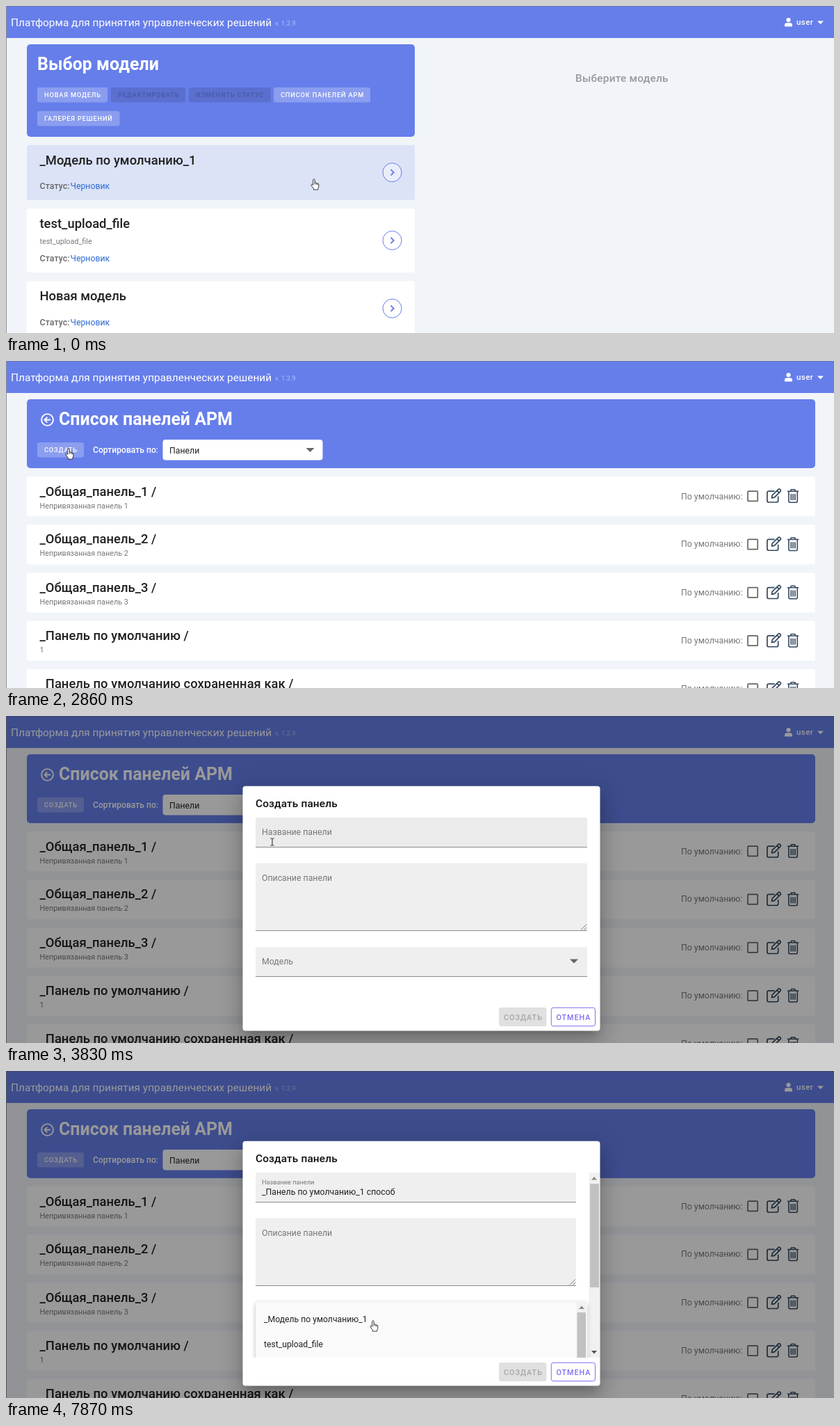
An HTML page for the animation above (7990 ms loop, 1191 by 470 pixels).

```html
<!DOCTYPE html>
<html lang="ru">
<head>
<meta charset="utf-8">
<title>Панели</title>
<style>
html, body { margin: 0; width: 100%; height: 100%; overflow: hidden; background: #f1f5fa; }
svg, #scrim, #shadow { position: absolute; left: 0; top: 0; }
svg { width: 1191px; height: 470px; font-family: Roboto, sans-serif; }
text { white-space: pre; }
#scrim { width: 1191px; height: 470px; background: #000; }
#shadow { left: 341px; top: 101px; width: 513px; height: 351px; border-radius: 4px;
  box-shadow: 0 8px 12px -5px rgba(0,0,0,.2), 0 18px 29px 2px rgba(0,0,0,.14), 0 7px 35px 6px rgba(0,0,0,.12); }
</style>
</head>
<body>
<svg id="page"></svg>
<div id="scrim"></div>
<div id="shadow"></div>
<svg id="form"></svg>
<svg id="pointer"></svg>
<script>
const LOOP = 7990;
const BLUE = '#667eea', INK = '#212121', GREY = '#777', ICON = '#34495e';
const $ = id => document.getElementById(id);

function add(parent, tag, attrs) {
  const e = document.createElementNS('http://www.w3.org/2000/svg', tag);
  for (const k in attrs) e.setAttribute(k, attrs[k]);
  parent.appendChild(e);
  return e;
}
const group = (p, attrs = {}) => add(p, 'g', attrs);
const rect = (p, x, y, w, h, fill, rx = 0) => add(p, 'rect', { x, y, width: w, height: h, fill, rx });
const path = (p, d, fill, stroke = 'none', width = 1) =>
  add(p, 'path', { d, fill, stroke, 'stroke-width': width });
function text(p, x, y, str, size, fill = INK, weight = 400, gap = 0) {
  const e = add(p, 'text', { x, y, fill, 'font-size': size, 'font-weight': weight });
  if (gap) e.setAttribute('letter-spacing', gap);
  e.textContent = str;
  return e;
}
const show = (e, on) => { e.style.display = on ? '' : 'none'; };

// ---------- page ----------
const page = $('page');
rect(page, 0, 0, 1191, 470, '#f1f5fa');
const listA = group(page), listB = group(page);

function button(p, x, y, w, label, off) {
  const r = rect(p, x, y, w, 21.5, off ? 'rgba(0,0,0,.12)' : 'rgba(255,255,255,.24)', 3);
  text(p, x + 10, y + 14.3, label, 9.3, off ? 'rgba(0,0,0,.2)' : '#fff', 500, .8);
  return r;
}

rect(listA, 30, 55, 558, 133, BLUE, 5);
text(listA, 45, 92, 'Выбор модели', 24.95, '#fff', 700);
button(listA, 45, 117, 101, 'НОВАЯ МОДЕЛЬ');
button(listA, 151, 117, 107, 'РЕДАКТИРОВАТЬ', true);
button(listA, 263, 117, 118, 'ИЗМЕНИТЬ СТАТУС', true);
const panelsBtn = button(listA, 385, 117, 139, 'СПИСОК ПАНЕЛЕЙ АРМ');
button(listA, 45, 151, 118.5, 'ГАЛЕРЕЯ РЕШЕНИЙ');

function model(y, h, title, note) {
  const r = rect(listA, 30, y, 558, h, '#fff', 3);
  const base = Math.floor(y);
  text(listA, 48.5, base + 28, title, 18.4, INK, 500);
  if (note) text(listA, 48.5, base + 51, note, 10.8, GREY);
  text(listA, 48.5, y + h - 16, 'Статус:', 12.3, '#666', 500, .1);
  text(listA, 92.5, y + h - 16, 'Черновик', 12.3, '#2a69d0');
  const cy = y + h / 2 - .3;
  add(listA, 'circle', { cx: 555.5, cy, r: 13.5, fill: '#fff', 'fill-opacity': .4, stroke: BLUE });
  path(listA, `M553.5 ${cy - 4.2}l4.2 4.2-4.2 4.2`, 'none', BLUE, 1.9);
  return r;
}
const firstModel = model(200, 79, '_Модель по умолчанию_1');
model(291.5, 91.5, 'test_upload_file', 'test_upload_file');
model(395.5, 79, 'Новая модель');
text(listA, 819, 109, 'Выберите модель', 15.4, '#999', 500, .2);

rect(listB, 30, 55, 1134, 99, BLUE, 5);
add(listB, 'circle', { cx: 59.5, cy: 84.5, r: 8.4, fill: 'none', stroke: '#fff', 'stroke-width': 1.9 });
path(listB, 'M64 84.5H56M59.3 80.7l-3.8 3.8 3.8 3.8', 'none', '#fff', 1.9);
text(listB, 76, 92, 'Список панелей АРМ', 24.95, '#fff', 700);
const createBtn = button(listB, 45, 117, 67, 'СОЗДАТЬ');
text(listB, 125, 132, 'Сортировать по:', 12.1, '#fff', 500);
rect(listB, 225.5, 113, 230, 29.5, '#fff', 4);
text(listB, 235, 132.5, 'Панели', 12.3);
path(listB, 'M431.5 125h12l-6 6z', '#666');

function panel(i, title, note) {
  const y = 166 + i * 69.25, base = Math.floor(y - .3 * (i > 0));
  const r = rect(listB, 30, y, 1134, 57, '#fff', 3);
  text(listB, 48.5, base + 28, title + ' /', 18.4, INK, 500);
  text(listB, 48.5, base + 46, note, 10.8, GREY);
  text(listB, 971, base + 33, 'По умолчанию:', 12.3, GREY);
  const g = group(listB, { transform: `translate(0 ${y})` });
  add(g, 'rect', { x: 1067, y: 21.2, width: 14.2, height: 14.2, rx: 1, fill: 'none', stroke: '#666', 'stroke-width': 1.7 });
  path(g, 'M1105.5 21.2h-8.3q-2.3 0-2.3 2.3v11.2q0 2.3 2.3 2.3h11.2q2.3 0 2.3-2.3v-6.2' +
    'M1101.5 30.7l.7-3.7 8.8-8.6q1-.8 2 0l1 1q.8 1 0 2l-8.8 8.7zM1109 20.4l3 3', 'none', ICON, 1.7);
  path(g, 'M1124 21.3h16.2M1128.3 21l1.4-2.3h4.8l1.4 2.3M1125.9 22v13.2q0 2 2 2h8.4q2 0 2-2V22' +
    'M1129.3 25v9M1132.1 25v9M1134.9 25v9', 'none', ICON, 1.6);
  return r;
}
const firstPanel = panel(0, '_Общая_панель_1', 'Непривязанная панель 1');
panel(1, '_Общая_панель_2', 'Непривязанная панель 2');
panel(2, '_Общая_панель_3', 'Непривязанная панель 3');
panel(3, '_Панель по умолчанию', '1');
panel(4, '_Панель по умолчанию сохраненная как', '1');

rect(page, 0, 0, 1191, 46, BLUE);
text(page, 7, 29, 'Платформа для принятия управленческих решений', 15.4, '#fff');
text(page, 387, 28, 'v. 1.2.9', 9.2, 'rgba(255,255,255,.5)', 400, .1);
add(page, 'circle', { cx: 1125.5, cy: 20, r: 3.1, fill: '#fff' });
path(page, 'M1120 29.5v-2q0-3.3 3.3-3.3h4.4q3.3 0 3.3 3.3v2z', '#fff');
text(page, 1137, 27, 'user', 11.5, '#fff', 500, .4);
path(page, 'M1167 21.5h9l-4.5 4.7z', '#fff');
rect(page, 0, 0, 1, 470, '#8a8c92');
rect(page, 0, 0, 1191, 1, '#6a75ae');

// ---------- dialog form ----------
const form = $('form');
rect(form, 340.5, 100.7, 514, 351.7, '#fff', 4);
text(form, 359, 130.5, 'Создать панель', 15.4, '#111', 500, .13);
const clip = add(add(form, 'defs', {}), 'clipPath', { id: 'body' });
rect(clip, 341, 140, 513, 272);
const body = group(form, { 'clip-path': 'url(#body)' });

function field(y, h) {
  return { box: path(body, '', '#efefef'), line: rect(body, 359, y + h - 1, 477, 1, '#8c8c8c'), y, h };
}
function setWidth(f, w) {
  f.box.setAttribute('d', `M359 ${f.y + f.h}v${3 - f.h}q0-3 3-3h${w - 6}q3 0 3 3v${f.h - 3}z`);
  f.line.setAttribute('width', w);
}
const name = field(146, 43), about = field(211.5, 97.5), model2 = field(332, 43);
const nameLabel = text(body, 368, 171, 'Название панели', 12.3, GREY);
const nameSmall = text(body, 368, 163, 'Название панели', 9.2, BLUE);
const nameText = text(body, 368, 178.3, '_Панель по умолчанию_1 способ', 12.3);
const caret = rect(body, 368, 166, 1, 16, '#222');
text(body, 368, 237, 'Описание панели', 12.3, GREY);
const grip = path(body, 'M827 307.5l8-8M831.5 307.5l3.5-3.5', 'none', '#777');
text(body, 368, 356.7, 'Модель', 12.3, GREY);
path(body, 'M811 349.5h12l-6 6z', '#666');

const scroll = group(body);
rect(scroll, 838.5, 146, 15.5, 266, '#f1f1f1');
rect(scroll, 840, 162, 13, 149, '#c1c1c1');
path(scroll, 'M842 156.5h8l-4-4.5z', '#8a8a8a');
path(scroll, 'M842 402h8l-4 4.5z', '#505050');
const menu = group(body);
const drop = rect(menu, 359, 332, 477, 190, '#fafafa', 3);
drop.style.filter = 'drop-shadow(0 2px 3px rgba(0,0,0,.28))';
text(menu, 371, 360.5, '_Модель по умолчанию_1', 12.2);
text(menu, 371, 397, 'test_upload_file', 12.2);
rect(menu, 820.5, 332, 14.5, 100, '#f1f1f1');
rect(menu, 821.5, 347, 12.5, 80, '#c1c1c1');
path(menu, 'M824 342h8l-4-4.5z', '#8a8a8a');

rect(form, 709, 419, 68.5, 27, '#e0e0e0', 3);
text(form, 716, 437, 'СОЗДАТЬ', 10.8, '#a6a6a6', 500, .96);
add(form, 'rect', { x: 784.3, y: 419.3, width: 63.2, height: 26.4, rx: 3, fill: '#fff', stroke: '#7d6ff0' });
text(form, 791.5, 437, 'ОТМЕНА', 10.8, '#7d6ff0', 500, .96);

// ---------- pointer, hot spot at 0,0 ----------
const pointer = $('pointer');
const shapes = {
  hand: group(pointer), arrow: group(pointer), beam: group(pointer)
};
path(shapes.hand, 'M-1.3 8V1.2Q-1.3 0 0 0T1.2 1.2V5.2Q3 4.4 3.6 5.6 5 5 5.4 6.4 6.8 6.2 6.8 7.6V10.5Q6.8 12 5.8 13.2V15H-.6V13.4L-3.8 9Q-4.6 7.6-3.4 7.2-2.4 7-1.3 8.4z' +
  'M1.2 5.2V7.6M3.6 5.6V7.8M5.4 6.4V8', '#fff', '#222', .9);
path(shapes.arrow, 'M.5.5V10L2.7 8.1 4.3 11.7 5.8 11 4.3 7.6H7.2z', '#fff', '#222', .9);
path(shapes.beam, 'M-2.5-5H-.5L0-4.5.5-5H2.5M0-4.5V4.5M-2.5 5H-.5L0 4.5.5 5H2.5', 'none', '#222');

// ---------- timeline ----------
const STEPS = [0, 250, 400, 540, 1340, 1480, 1610, 1760, 2040, 2180, 2310, 2440, 2570, 2710, 2860,
  3130, 3250, 3380, 3530, 3680, 3830, 3950, 4070, 4220, 4370, 4680, 4800, 5330,
  5630, 5760, 5890, 6030, 6160, 6290, 6420, 6570, 6690, 6820, 6960, 7090, 7220, 7360, 7490, 7630, 7750, 7870];
const PATH = [
  [0, 443, 249], [250, 441, 215], [400, 436, 155], [540, 431, 125], [1760, 431, 125],
  [2040, 340, 150], [2180, 200, 178], [2310, 135, 177], [2570, 108, 150], [2860, 90, 126],
  [3250, 90, 126], [3530, 240, 160], [3830, 383, 181], [4070, 386, 176], [5330, 386, 176],
  [5630, 420, 205], [6030, 620, 345], [6160, 690, 380], [6420, 731, 330], [6570, 690, 350],
  [6820, 690, 350], [7220, 640, 375], [7630, 555, 390], [7870, 528, 359]
];
const KINDS = [[0, 'hand'], [1760, 'arrow'], [2180, 'hand'], [3130, 'arrow'], [3830, 'beam'],
  [5890, 'arrow'], [6570, 'hand']];
const SCRIM = [[0, 0], [3130, .08], [3250, .3], [3380, .4]];
const PRESS = [[0, .24], [1340, .34], [1480, .44], [1610, .52]];

const last = (table, t) => table.filter(r => r[0] <= t).pop();
function position(t) {
  const i = PATH.findIndex(p => p[0] > t);
  if (i < 0) return PATH[PATH.length - 1].slice(1);
  const [t0, x0, y0] = PATH[i - 1], [t1, x1, y1] = PATH[i];
  const k = (t - t0) / (t1 - t0);
  return [x0 + (x1 - x0) * k, y0 + (y1 - y0) * k];
}
const between = (t, a, b) => t >= a && t < b;

function draw(now) {
  const t = STEPS.filter(s => s <= now).pop();
  show(listA, t < 1760);
  show(listB, t >= 1760);
  firstModel.setAttribute('fill', t < 400 ? '#dce3f7' : '#fff');
  firstPanel.setAttribute('fill', between(t, 2180, 2570) ? '#dce3f7' : '#fff');
  panelsBtn.setAttribute('fill', `rgba(255,255,255,${last(PRESS, t)[1]})`);
  createBtn.setAttribute('fill', `rgba(255,255,255,${between(t, 3130, 3380) ? .42 : .24})`);

  const scrim = $('scrim');
  scrim.style.opacity = last(SCRIM, t)[1];
  scrim.style.clipPath = t < 3250 ? 'inset(46px 0 0 0)' : '';
  const open = t >= 3250;
  show($('shadow'), open);
  show(form, open);

  const focus = between(t, 4220, 6690), listed = t >= 6820, width = listed ? 461 : 477;
  [name, about, model2].forEach(f => setWidth(f, width));
  grip.setAttribute('transform', `translate(${width - 477} 0)`);
  name.box.setAttribute('fill', between(t, 3830, 4070) ? '#ebebeb' : '#efefef');
  name.line.setAttribute('fill', focus ? BLUE : '#8c8c8c');
  name.line.setAttribute('y', focus ? 187.4 : 188);
  name.line.setAttribute('height', focus ? 1.6 : 1);
  show(nameLabel, t < 4220);
  show(nameSmall, t >= 4220);
  nameSmall.setAttribute('fill', focus ? BLUE : GREY);
  show(nameText, t >= 4800);
  show(caret, between(t, 4220, 4680) || between(t, 4800, 5330) || between(t, 5890, 6420));
  caret.setAttribute('x', t < 4800 ? 368 : 558);
  const over = between(t, 6030, 6820) && !between(t, 6160, 6290);
  model2.box.setAttribute('fill', over ? '#e2e2e2' : '#efefef');
  model2.line.setAttribute('fill', over ? '#555' : '#8c8c8c');
  show(scroll, listed);
  show(menu, listed);
  menu.setAttribute('opacity', t < 6960 ? .6 : 1);

  const kind = last(KINDS, t)[1], [x, y] = position(t);
  for (const k in shapes) show(shapes[k], k === kind);
  shapes[kind].setAttribute('transform', `translate(${x} ${y})`);
}

const start = performance.now();
function tick() {
  draw((performance.now() - start) % LOOP);
  requestAnimationFrame(tick);
}
draw(0);
requestAnimationFrame(tick);
</script>
</body>
</html>
```
